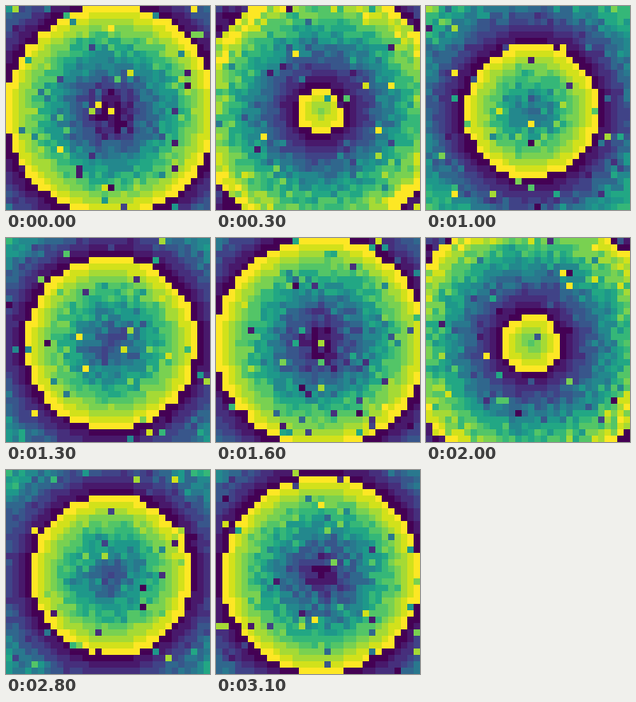
A matplotlib script that plays this animation: 256x256 px, repeating every 3.2 s.

```python
import numpy as np
import matplotlib.pyplot as plt
from matplotlib.animation import FuncAnimation

SIZE = 256
GRID = 32
LEVELS = 16
FRAMES = 32
EDGE_JITTER = 0.1   # wobble of the ring radius, in cells
MOTTLE = 0.95       # spread of levels far from the bright front
OUTLIERS = 0.055    # share of cells with a random level

rows, cols = np.mgrid[:GRID, :GRID]
radius = np.hypot(cols - GRID // 2, rows - GRID // 2)


def field(step):
    """Rings of cyclic levels that travel outward one cell per step."""
    rng = np.random.default_rng(100 + step)
    ring = np.rint(radius + rng.normal(0, EDGE_JITTER, radius.shape))
    level = (ring - step - 1) % LEVELS

    # The front stays clean; cells away from it are grainy.
    front = (step - 1) % LEVELS + 1.5
    grain = MOTTLE * np.clip((np.abs(radius - front) - 2) / 4, 0, 1)
    level = np.rint(level + grain * rng.normal(size=radius.shape))

    stray = rng.random(radius.shape) < OUTLIERS
    level[stray] = rng.integers(0, LEVELS, stray.sum())
    return np.clip(level, 0, LEVELS - 1)


fig = plt.figure(figsize=(SIZE / 100, SIZE / 100), dpi=100)
ax = fig.add_axes([0, 0, 1, 1])
ax.axis("off")
image = ax.imshow(field(0), cmap="viridis", vmin=0, vmax=LEVELS - 1,
                  interpolation="nearest", aspect="auto")


def update(step):
    image.set_data(field(step))
    return [image]


anim = FuncAnimation(fig, update, frames=FRAMES, interval=100,
                     repeat=True, repeat_delay=0)
plt.show()
```
